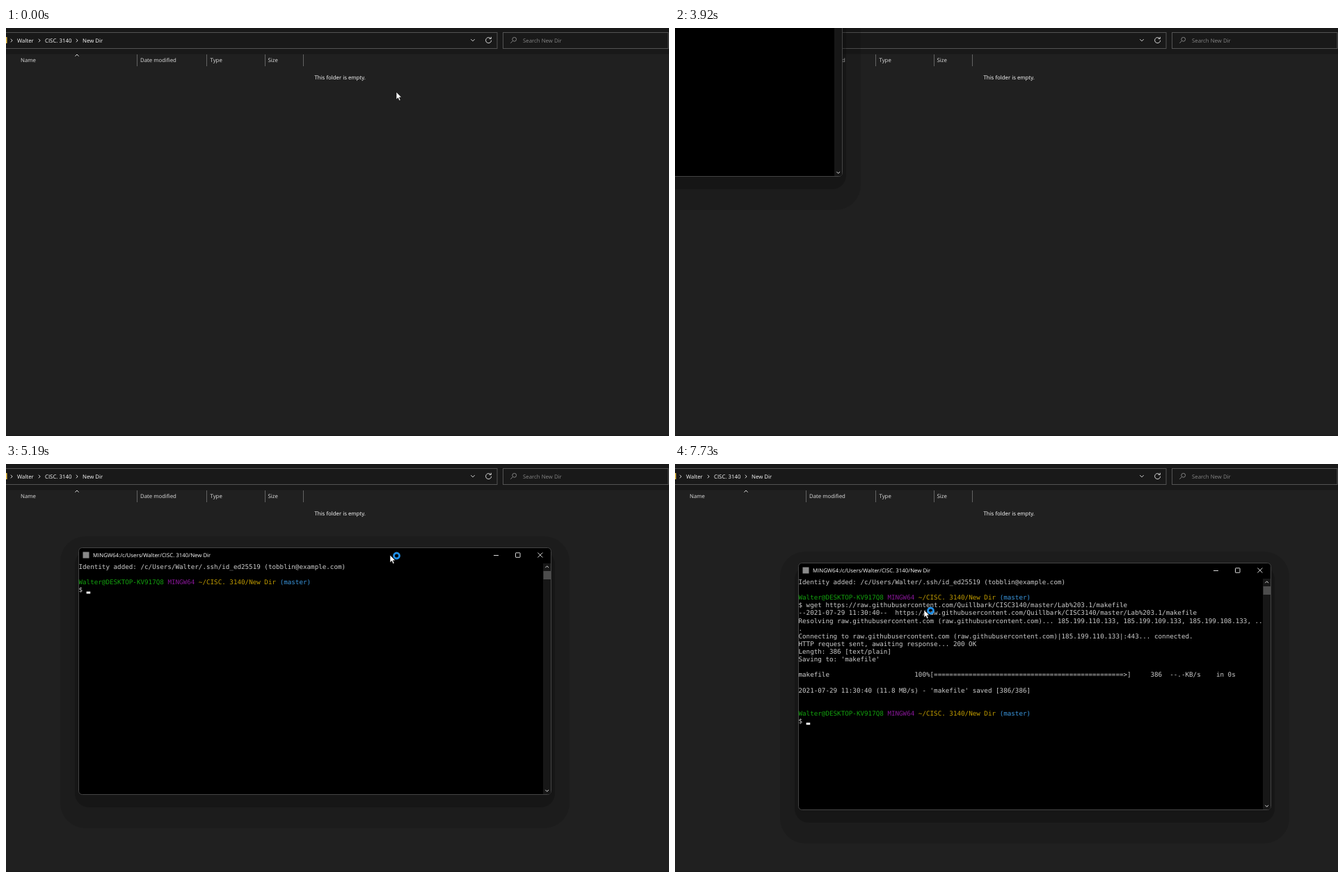
These frames come from a looping animation (953 px wide and 587 px high, 8 s). An HTML page:

```html
<!DOCTYPE html>
<html lang="en">
<head>
<meta charset="utf-8">
<title>Downloading a makefile</title>
<style>
  html, body { margin: 0; width: 100%; height: 100%; overflow: hidden; background: #202020; }
  svg { display: block; width: 100vw; height: 100vh; }
  text { font: 7.83px "Open Sans", "Noto Sans", sans-serif; fill: #fff; white-space: pre; text-rendering: geometricPrecision; }
  .dim { fill: #dedede; }
  .faint { fill: #858585; }
  .big { font-size: 9.2px; }
  .keys { font-size: 7.8px; letter-spacing: .25px; fill: #d0d0d0; }
  .mono { font: 9.243px "DejaVu Sans Mono", "Liberation Mono", monospace; fill: #ccc; }
  .line { fill: none; stroke: #d8d8d8; stroke-width: 1; }
  .blue { stroke: #4cb4e8; }
</style>
</head>
<body>
<svg id="stage" viewBox="0 0 953 587"></svg>
<script>
const LOOP = 8000;
const USER = 'Walter', HOST = 'DESKTOP-KV917Q8', MAIL = 'tobblin@example.com', REPO = 'Quillbark';
const SITE = 'raw.githubusercontent.com';
const URL_TEXT = `https://${SITE}/${REPO}/CISC3140/master/Lab%203.1/makefile`;

// Drawing helpers; labels are placed by the middle of their capitals.
const label = (x, mid, str, cls = '') =>
  `<text x="${x}" y="${mid + (cls.includes('big') ? 3.2 : 2.8)}" class="${cls}">${str}</text>`;
const path = (d, cls = '', extra = '') => `<path d="${d}" class="line ${cls}" ${extra}/>`;
const box = (x, y, w, h, fill, r = 0, extra = '') =>
  `<rect x="${x}" y="${y}" width="${w}" height="${h}" rx="${r}" fill="${fill}" ${extra}/>`;
const right = (x, y, s = 3) => path(`M${x - s / 2} ${y - s}l${s} ${s}l${-s} ${s}`);
const caret = (x, y, s, up) => path(`M${x - s} ${y + (up ? s : -s) / 2}l${s} ${up ? -s : s}l${s} ${up ? s : -s}`);
const group = (id, body) => `<g id="${id}">${body}</g>`;
const rule = (x1, x2, y) => path(`M${x1} ${y}H${x2}`, '', 'style="stroke:#414141"');

function explorer() {
  const frame = 'stroke="#535353"';
  return box(0, 0, 953, 37.5, '#191919') +
    box(-5, 6.5, 711, 23, '#191919', 0, frame) +
    box(714.5, 6.5, 237.5, 23, '#191919', 0, frame) +
    box(0, 13, 1.5, 9, '#f2c94c') +
    [[8, 'M'], [48, ''], [102, '']].map(([x]) => right(x, 18, 2.3)).join('') +
    label(16, 18, USER) + label(56, 18, 'CISC. 3140') + label(110, 18, 'New Dir') +
    caret(671, 17.5, 2.7) +
    path('M696.6 15A4 4 0 1 0 697.6 17.8M697.3 12.8V15.4H694.6') +
    `<g style="opacity:.55">${path('M728.3 18.7L725.3 21.7')}<circle cx="730.7" cy="16.3" r="2.9" class="line"/></g>` +
    label(743, 18, 'Search New Dir', 'faint') +
    caret(102, 39.3, 2.6, true) +
    label(21, 46.3, 'Name', 'dim') + label(193, 46.3, 'Date modified', 'dim') +
    label(293.5, 46.3, 'Type', 'dim') + label(376.5, 46.3, 'Size', 'dim') +
    path([188.5, 288.5, 372.5, 427.5].map(x => `M${x} 38V55`).join(''), '', 'style="stroke:#636363"') +
    label(443.5, 71, 'This folder is empty.') +
    box(0, 585.5, 953, 1.5, '#1a1a1a');
}

// Icons are drawn around their own centre.
const icons = {
  view: [-4.5, 1].flatMap(x => [-4.5, 1].map(y => box(x, y, 3.6, 3.6, 'none', 1, 'class="line"'))).join(''),
  sort: path('M-2.5 4.5V-4.2M-5 -1.7L-2.5 -4.2L0 -1.7') + path('M2.7 -4.5V4.2M.2 1.7L2.7 4.2L5.2 1.7', 'blue'),
  group: path('M-1.5 -4H5M-1.5 0H5M-1.5 4H5') + path('M-5 -4H-3M-5 -1V1H-3M-5 4H-3', 'blue'),
  undo: path('M-4 -5V-.8H.2M-4 -1C-1 -5.5 4.5 -4.5 4 -.5C3.7 1.5 1 3 -1 5', 'blue'),
  add: '<circle r="5" class="line"/>' + path('M-2.5 0H2.5M0 -2.5V2.5', 'blue'),
  props: box(-4, -5, 8, 10, 'none', 1, 'class="line"') + path('M-2.3 -2.2H-.3M-2.3 0H-.3M-2.3 2.2H-.3', 'blue') + path('M.8 -2.2H2.5M.8 2.2H2.5'),
  term: box(-4.5, -4.5, 9, 9, '#565656'),
  more: path('M-1 -4.5H-4.5V4.5H4.5V1') + path('M0 0L4.5 -4.5M1 -4.7H4.7V-1', 'blue'),
  git: box(-4, -4, 8, 8, '#d8a24a')
};
const icon = (name, x, y) => `<g transform="translate(${x} ${y})">${icons[name]}</g>`;

// Rows: middle, text, icon, then '>' for a submenu or a shortcut.
function shortMenu() {
  const rows = [
    [109, 'View', 'view', '>'], [137, 'Sort by', 'sort', '>'], [165, 'Group by', 'group', '>'],
    [199, 'Undo Delete', 'undo', 'Ctrl+Z'], [226.5, 'New', 'add', '>'], [254.5, 'Properties', 'props', 'Alt+Enter'],
    [288.3, 'Open in Windows Terminal', 'term'], [322.5, 'Show more options', 'more', 'Shift+F10']
  ];
  return box(560, 94, 224, 250, '#000', 8, 'opacity=".09"') +
    box(563, 93, 217, 246, '#2b2b2b', 6, 'stroke="#3c3c3c"') +
    [181.5, 271.5, 305.5].map(y => rule(563.5, 779.5, y)).join('') +
    rows.map(([y, str, pic, end]) => icon(pic, 579.7, y) + label(592.7, y, str, 'big') +
      (end === '>' ? right(765.5, y, 3.2) : end ? label(733, y + .8, end, 'keys') : '')).join('');
}

function longMenu() {
  const rows = [
    [332, 'View', '', '>'], [347.2, 'Sort by', '', '>'], [362.5, 'Group by', '', '>'], [377.8, 'Refresh'],
    [398, 'Customize this folder...'], [418, 'Paste'], [433.3, 'Undo Delete', '', 'Ctrl+Z'],
    [448.5, 'Open in Windows Terminal', 'term'], [463.8, 'Git GUI Here', 'git'], [479, 'Git Bash Here', 'git'],
    [499.3, 'Give access to', '', '>'], [519.3, 'New', '', '>'], [539.5, 'Properties']
  ];
  return box(606, 322, 184, 234, '#000', 8, 'opacity=".09"') +
    box(609.5, 321.5, 176.5, 229, '#2c2c2c', 5, 'stroke="#424242"') +
    [388, 408, 489.5, 509.5, 529.5].map(y => rule(611, 784, y)).join('') +
    rows.map(([y, str, pic, end]) => (pic ? icon(pic, 622, y) : '') +
      label(633, y, str, str === 'Paste' ? 'faint' : '') +
      (end === '>' ? right(775.3, y, 2.8) : end ? label(749, y, end) : '')).join('');
}

// Terminal text sits on a grid of columns and rows.
const COL = 5.565, ROW = 11.11, LEFT = 176.5, BASE = 173;
const mono = (row, str) => `<text x="${LEFT}" y="${BASE + row * ROW}" class="mono">${str}</text>`;
const tint = (color, str) => `<tspan fill="${color}">${str}</tspan>`;
const prompt = row => mono(row, tint('#13a10e', `${USER}@${HOST}`) + ' ' + tint('#881798', 'MINGW64') + ' ' +
  tint('#c19c00', '~/CISC. 3140/New Dir') + ' ' + tint('#3a96dd', '(master)'));

function terminal() {
  const lookup = `${SITE} (${SITE})`;
  const bar = ' '.repeat(22) + '100%[' + '='.repeat(49) + '&gt;]     386  --.-KB/s    in 0s';
  return box(150, 126, 732, 420, '#000', 36, 'opacity=".12"') +
    box(171, 146, 690, 370, '#000', 20, 'opacity=".2"') +
    box(176.5, 142.5, 679, 355, '#000', 5, 'stroke="#444"') +
    path('M844 165H855V493.5Q855 497 851.5 497H844Z', '', 'style="fill:#171717;stroke:none"') +
    box(844.5, 176, 10.5, 12, '#4d4d4d') +
    caret(849.7, 170, 2.4, true) + caret(849.7, 492, 2.4) +
    box(182.5, 148.5, 9, 9, '#8a8a8a') +
    label(197, 153.3, `MINGW64:/c/Users/${USER}/CISC. 3140/New Dir`) +
    path('M773 153.5H780') + box(804.5, 149.8, 6.5, 6.5, 'none', .5, 'class="line"') +
    path('M836.3 149.5L843.3 156.5M843.3 149.5L836.3 156.5') +
    mono(0, `Identity added: /c/Users/${USER}/.ssh/id_ed25519 (${MAIL})`) +
    prompt(2) + mono(3, '$') +
    group('command', mono(3, '  wget ' + URL_TEXT)) +
    group('resolve', mono(4, '--2021-07-29 11:30:40--  ' + URL_TEXT) +
      mono(5, `Resolving ${lookup}... 185.199.110.133, 185.199.109.133, 185.199.108.133, ..`) + mono(6, '.')) +
    group('connect', mono(7, `Connecting to ${lookup}|185.199.110.133|:443... connected.`) +
      mono(8, 'HTTP request sent, awaiting response... 200 OK') +
      mono(9, 'Length: 386 [text/plain]') + mono(10, "Saving to: 'makefile'")) +
    group('saved', mono(12, 'makefile' + bar) +
      mono(14, "2021-07-29 11:30:40 (11.8 MB/s) - 'makefile' saved [386/386]")) +
    group('again', prompt(17) + mono(18, '$')) +
    `<rect id="caret" width="5.6" height="3" fill="#fff"/>`;
}

const pointer = '<path d="M0 0V10.8L2.5 8.5L4.3 12.6L6.1 11.8L4.4 7.8H7.7Z" fill="#fff" stroke="#000" stroke-width=".6"/>' +
  '<circle id="busy" cx="9.5" cy="1" r="4" fill="none" stroke="#1f8fe8" stroke-width="2.8"/>';

document.getElementById('stage').innerHTML = explorer() + group('menu1', shortMenu()) +
  group('menu2', longMenu()) + group('window', terminal()) + group('mouse', pointer);

const menu1 = [[0, 0, 0], [530, .7, -4], [680, 1, 0], [1690, .8, 0], [1810, .55, 0], [1930, .3, 0], [2060, .12, 0], [2210, 0, 0]];
const menu2 = [[0, 0], [2210, .55], [2340, 1], [3460, 0]];
const mouse = [[0, 561, 92], [1140, 564, 98], [1260, 600, 177], [1410, 605, 245], [1540, 611, 314], [1690, 609, 321],
  [2640, 620, 395], [2760, 629, 438], [2910, 637, 456], [3030, 644, 471], [3180, 645, 476], [3610, 668, 472],
  [3770, 153, 28], [3920, 21, -122], [4910, 206, -37], [5040, 400, 55], [5190, 552, 131], [5340, 616, 150],
  [5620, 569, 155], [5770, 500, 172], [5900, 408, 199], [6030, 358, 210]];
const drag = [[0, -615, -284], [4910, -430, -199], [5040, -236, -107], [5190, -72, -22], [5340, 0, 0], [5470, 1, 0]];
const typing = [[0, 2, 3], [5620, -1, 0], [6290, 85, 3], [7240, 0, 7], [7360, 0, 11], [7480, 0, 16], [7730, 2, 18]];
const shownFrom = { window: 3610, busy: 3610, command: 6170, resolve: 7240, connect: 7360, saved: 7480, again: 7730 };

const el = id => document.getElementById(id);
const at = (keys, t) => keys.findLast(k => k[0] <= t).slice(1);
const show = (id, on) => el(id).setAttribute('visibility', on ? 'inherit' : 'hidden');
const move = (id, x, y) => el(id).setAttribute('transform', `translate(${x} ${y})`);

function draw(t) {
  const [fade, slide] = at(menu1, t);
  el('menu1').setAttribute('opacity', fade);
  move('menu1', 0, slide);
  el('menu2').setAttribute('opacity', at(menu2, t)[0]);
  move('window', ...at(drag, t));
  move('mouse', ...at(mouse, t));
  for (const id in shownFrom) show(id, t >= shownFrom[id]);
  const [col, row] = at(typing, t);
  show('caret', col >= 0 && t >= shownFrom.window);
  move('caret', LEFT + col * COL, BASE + row * ROW - .8);
}

const start = performance.now();
function tick() {
  draw((performance.now() - start) % LOOP);
  requestAnimationFrame(tick);
}
tick();
</script>
</body>
</html>
```
